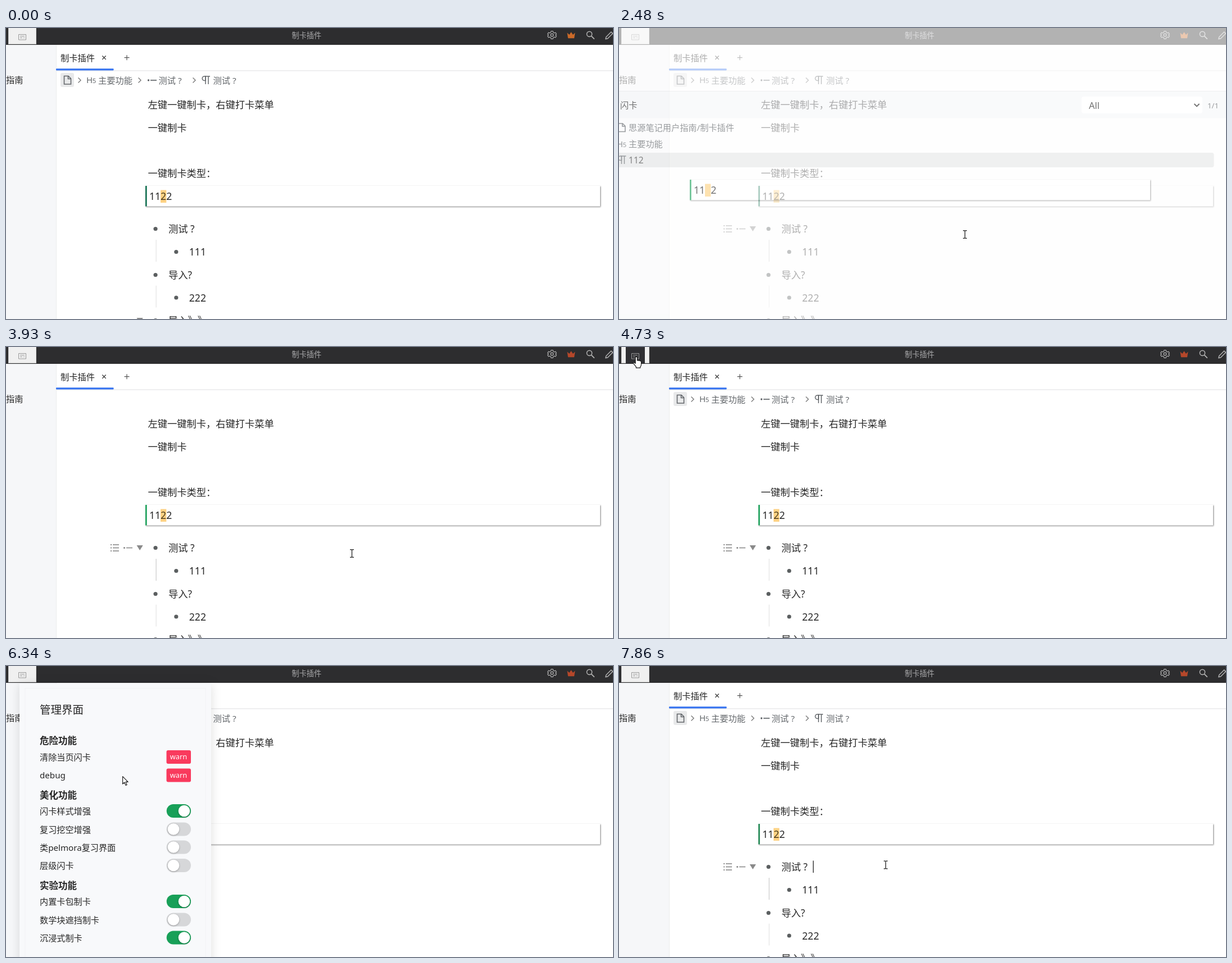
Recreate the animation shown at these times as an HTML page. Size 1080 by 518 pixels, loop 8 s.

```html
<!DOCTYPE html>
<html lang="zh-CN">
<head>
<meta charset="utf-8">
<title>制卡插件</title>
<style>
html, body { margin: 0; width: 100%; height: 100%; overflow: hidden; background: #fff; }
svg { display: block; width: 1080px; height: 518px; }
text { font-family: "Noto Sans", "Noto Sans CJK SC", sans-serif; white-space: pre; text-spacing-trim: space-all; }
.card { filter: drop-shadow(1px 1px 1.2px rgba(0, 0, 0, .5)); }
.panel { filter: drop-shadow(0 2px 9px rgba(0, 0, 0, .13)); }
</style>
</head>
<body>
<svg id="stage" viewBox="0 0 1080 518" xmlns="http://www.w3.org/2000/svg"></svg>
<script>
const INK = '#262626', GREY = '#63676b', ICON = '#b4b4b4', GREEN = '#18a058';

// Markup helpers; text is centred on yc.
const text = (x, yc, size, str, fill = INK, more = '') =>
  `<text x="${x}" y="${yc + size * 0.365}" font-size="${size}" fill="${fill}" ${more}>${str}</text>`;
const rect = (x, y, w, h, fill, more = '') =>
  `<rect x="${x}" y="${y}" width="${w}" height="${h}" fill="${fill}" ${more}/>`;
const line = (d, stroke, w = 1.4, more = '') =>
  `<path d="${d}" fill="none" stroke="${stroke}" stroke-width="${w}" ${more}/>`;
const dot = (x, y, r, fill, more = '') =>
  `<circle cx="${x}" cy="${y}" r="${r}" fill="${fill}" ${more}/>`;
const group = (id, body, more = '') => `<g id="${id}" ${more}>${body}</g>`;

const docIcon = (x, y) =>
  line(`M${x} ${y}h7.5l4.5 4.5v10h-12zM${x + 7} ${y}v5h5`, GREY, 1.6);
const pilcrow = (x, y) =>
  `<path d="M${x + 6} ${y - 7}h-2a3.8 3.8 0 0 0 0 7.6h2z" fill="none" stroke="${GREY}" stroke-width="1.5"/>` +
  line(`M${x + 5} ${y - 7}h9M${x + 6} ${y - 7}v14M${x + 11} ${y - 7}v14`, GREY, 1.5);
const heading = (x, y) =>
  text(x, y, 15, 'H', GREY) + text(x + 10.8, y + 1.2, 11.5, '5', GREY);
const chevron = (x, y) => line(`M${x - 2.5} ${y - 4.5}l4.5 4.5-4.5 4.5`, '#777');

function cardBox(x, y, w, barId, word) {
  return rect(x, y, w, 36.5, '#fff', 'class="card"') +
    rect(x, y, 2.6, 36.5, GREEN, barId ? `id="${barId}"` : '') +
    rect(x + 27, y + 7.5, 10.3, 22.5, '#fdd284') +
    text(x + 7, y + 19, 17.6, '11') +
    text(x + 27.1, y + 19, 17.6, word, '#4a3a1a') +
    text(x + 37.2, y + 19, 17.6, '2');
}

function titleBar() {
  const gear = dot(971.5, 12.5, 2.4, 'none', `stroke="${ICON}" stroke-width="1.2"`) +
    line('M970 5.5h3l.6 2.2 2 1.1 2.2-.6 1.5 2.6-1.6 1.7 1.6 1.7-1.5 2.6-2.2-.6-2 1.1-.6 2.2h-3l-.6-2.2-2-1.1-2.2.6-1.5-2.6 1.6-1.7-1.6-1.7 1.5-2.6 2.2.6 2-1.1z', ICON, 1.2);
  return rect(0, 0, 1080, 30, '#2d2d2f') +
    rect(4.5, -0.5, 49, 29, '#f0f0f0', 'stroke="#cfcfcf"') +
    rect(12, 0, 34, 29, '#2f2f33', 'id="hover"') +
    line('M22.5 11.5h13v9.5h-13zM25 14.5h8M25 17.5h4M31 17.5h2', '#999', 1) +
    text(508.5, 13.5, 13.15, '制卡插件', '#a9a9ab') + gear +
    '<path id="crown" d="M998.5 8.5l3.7 3.4 3.3-4.6 3.3 4.6 3.7-3.4-1.5 9.8h-11z"/>' +
    dot(1038, 10.8, 4.6, 'none', `stroke="${ICON}" stroke-width="1.5"`) +
    line('M1041.3 14.2l5.5 5.5', ICON, 1.7) +
    line('M1067 19.5l.7-3.5 9-9 2.8 2.8-9 9z', ICON, 1.4);
}

function page() {
  const row = (x, y, str, size = 17.25) => dot(x, y, 3.6, '#5b5f60') + text(x + 23, y + 0.5, size, str);
  const crumbs = rect(97, 80, 24, 25, '#e8e9ea', 'rx="3"') + docIcon(103.5, 85.5) +
    chevron(131, 93) + heading(143, 93) + text(164, 93, 15.25, '主要功能', GREY) +
    chevron(238, 93) + dot(253.5, 93, 1.7, GREY) + line('M257 93h11', GREY, 1.7) +
    text(271.5, 93, 15.25, '测试 ?', GREY) + chevron(335, 93) + pilcrow(349, 93) +
    text(368.5, 93, 15.25, '测试 ?', GREY);
  let list = '';
  for (const y of [352, 357.5, 363])
    list += rect(186, y - 1, 2, 2, '#8a8a8a') + line(`M190 ${y}h11`, '#8a8a8a', 1.6);
  list += dot(210.5, 357.5, 1.6, '#8a8a8a') + line('M214 357.5h11', '#8a8a8a', 1.6);

  return rect(0, 30, 89, 488, '#f6f7f9') + rect(89, 30, 1, 488, '#eceded') +
    text(0, 92, 15.25, '指南') +
    rect(89, 75.5, 991, 1, '#dfe0e2') + rect(89, 72.3, 102.5, 3.2, '#3573f0', 'rx="1"') +
    text(97, 53, 15.25, '制卡插件') +
    line('M171.3 49.5l6.4 6.4M177.7 49.5l-6.4 6.4', '#444') +
    line('M210.5 52.7h9M215 48.2v9', '#555', 1.2) +
    group('crumbs', crumbs) +
    text(252.5, 137, 17.25, '左键一键制卡\uff0c右键打卡菜单') +
    text(252.5, 177.5, 17.25, '一键制卡') +
    text(252.5, 259, 17.25, '一键制卡类型\uff1a') +
    cardBox(248, 281, 809, 'bar', '2') +
    row(266, 357.5, '测试 ?') + row(302.8, 398.5, '111', 17.6) +
    row(266, 439.5, '导入?') + row(302.8, 480, '222', 17.6) + row(266, 520.5, '导入》》') +
    rect(266.5, 377, 1.2, 39, '#ccc', 'id="guide"') + rect(266.5, 458.5, 1.2, 39, '#e4e4e4') +
    '<path id="fold" d="M232.5 353h11.2l-5.6 9z" fill="#8a8a8a"/>' +
    group('gutter', list) + rect(345, 346.5, 1.2, 21.5, '#111', 'id="caret"');
}

function review() {
  return rect(0, 0, 1080, 518, '#fefefe') +
    rect(0, 112, 1080, 48.5, '#f7f8fa') + rect(0, 112, 1080, 1, '#e6e7e9') +
    text(2, 137.5, 15.25, '闪卡') + rect(823, 122, 215, 30, '#fff', 'rx="4"') +
    text(836, 138, 16.5, 'All') + line('M1023.5 135l4.5 4.5 4.5-4.5', '#222', 1.9) +
    text(1047, 138, 13.2, '1/1', GREY) +
    docIcon(-1, 170) + text(17, 177, 15.2, '思源笔记用户指南/制卡插件', GREY) +
    heading(-4, 206.5) + text(17, 206.5, 15.2, '主要功能', GREY) +
    rect(-10, 222, 1068.5, 26, '#e7e8e8', 'rx="4"') + pilcrow(-1.5, 235) +
    text(17, 235.5, 15.6, '112', '#444') +
    cardBox(126, 270, 819, '', '');
}

function panel() {
  const head = (y, str) => text(60, y, 16.5, str, INK, 'font-weight="700"');
  const item = (y, str) => text(60, y, 15.15, str);
  const warn = (y, str) => item(y, str) + rect(285.5, y - 12, 43.5, 24, '#f93a5d', 'rx="3"') +
    text(291.8, y - 0.5, 12.8, 'warn', '#fff', 'font-weight="500"');
  const toggle = (y, str, on, id = '') => item(y + 0.5, str) +
    `<g ${id && `id="${id}"`}>` + rect(285.7, y - 12, 43.3, 24, on ? GREEN : '#d6d7d9', 'rx="12"') +
    dot(on ? 317 : 298, y, 10.3, '#fff', 'style="filter:drop-shadow(0 1px 1.5px rgba(0,0,0,.3))"') + '</g>';
  return rect(24, 31, 341, 520, '#f8f9fb', 'class="panel"') +
    rect(34, 39.5, 321, 520, '#f8f9fb', 'stroke="#f1f2f5"') +
    text(60, 78, 19.5, '管理界面') +
    head(133, '危险功能') + warn(162, '清除当页闪卡') + warn(194.5, 'debug') +
    head(229.5, '美化功能') + toggle(258, '闪卡样式增强', 1) + toggle(290.5, '复习挖空增强', 0, 'live') +
    toggle(322.5, '类pelmora复习界面', 0) + toggle(355, '层级闪卡', 0) +
    head(390.5, '实验功能') + toggle(419, '内置卡包制卡', 1) +
    toggle(451.5, '数学块遮挡制卡', 0) + toggle(483.5, '沉浸式制卡', 1);
}

const outline = 'fill="#fff" stroke="#111" stroke-width="1.1" stroke-linejoin="round"';
const pointers =
  group('beam', line('M-3.5 -6.8h2.6l.9.8.9-.8h2.6M0 -6v12M-3.5 6.8h2.6l.9-.8.9.8h2.6', '#222', 1.3)) +
  group('arrow', `<path d="M0 0v13.4l3.1-2.8 2.3 5.2 2.1-.9-2.2-5.1h4.2z" ${outline}/>`) +
  group('hand', `<path d="M-1.6 1.2q1.6-2.2 3.2 0v5.6q1.5-1.2 2.7.3 1.6-1 2.5.6 1.8-.5 1.9 1.4v5q0 2.2-1.6 3.6v2.1h-7.5v-1.9l-4.9-6q-.6-1.9 1.4-1.7l2.3 1.7z" ${outline}/>`);

const $ = id => document.getElementById(id);
$('stage').innerHTML = page() + titleBar() + group('panel', panel()) +
  group('review', review()) + group('pointer', pointers);

const LOOP = 8000;
// [time, x, y]
const moves = [
  [280, 1002, 509], [740, 615.5, 367.5], [4160, 615.5, 367.5], [4460, 44, 27], [4640, 44, 27],
  [4820, 18, 8], [5000, 25, 14], [5820, 25, 14], [6670, 299, 288], [6700, 299, 288], [6740, 303, 289],
  [6990, 303, 289], [7070, 312, 291], [7210, 312, 291], [7600, 474.5, 354]
];
const kinds = [
  [0, ''], [280, 'beam'], [2560, 'arrow'], [3790, 'beam'], [4220, 'arrow'], [4460, 'hand'],
  [5900, 'arrow'], [6740, 'hand'], [7270, 'arrow'], [7400, 'beam']
];

const clamp = v => Math.max(0, Math.min(1, v));
const between = (t, a, b) => t >= a && t < b;
const show = (id, on) => $(id).setAttribute('visibility', on ? 'inherit' : 'hidden');
const fade = (id, a) => { $(id).setAttribute('opacity', a); show(id, a > 0); };

function pointerAt(t) {
  const i = moves.findIndex(m => m[0] > t);
  if (i === 0) return moves[0].slice(1);
  if (i < 0) return moves[moves.length - 1].slice(1);
  const [a, b] = [moves[i - 1], moves[i]];
  const p = (t - a[0]) / (b[0] - a[0]);
  const e = p * p * (3 - 2 * p);
  return [a[1] + (b[1] - a[1]) * e, a[2] + (b[2] - a[2]) * e];
}

function draw(t) {
  const hovered = t >= 950;
  show('gutter', hovered);
  $('fold').setAttribute('transform', hovered ? '' : 'translate(0 163)');
  $('guide').setAttribute('fill', between(t, 950, 4260) || t >= 7600 ? '#cacaca' : '#e4e4e4');
  show('caret', between(t, 130, 740) || between(t, 1280, 1800) || t >= 7740);
  show('crumbs', !between(t, 2590, 4260));
  show('hover', between(t, 4400, 5900));
  $('crown').setAttribute('fill', t < 2590 ? '#cb6a29' : '#b5472a');
  $('bar').setAttribute('fill', t < 2590 ? '#0f6e4f' : t < 7740 ? GREEN : '#1c8650');

  fade('review', t < 2340 || t >= 3930 ? 0 : clamp((t - 2290) / 300));
  fade('panel', t < 5670 ? 0 : t < 7740 ? 1 : clamp((7860 - t) / 180));

  const p = clamp((t - 7060) / 300);
  const on = 1 - (1 - p) * (1 - p);
  const [rail, knob] = $('live').children;
  const mix = (a, b) => Math.round(a + (b - a) * on);
  rail.setAttribute('fill', `rgb(${mix(214, 24)},${mix(215, 160)},${mix(217, 88)})`);
  rail.setAttribute('stroke', GREEN);
  rail.setAttribute('stroke-width', 3);
  rail.setAttribute('stroke-opacity', t >= 7000 ? 0.25 : 0);
  knob.setAttribute('cx', 298 + 19 * on);

  const kind = kinds.filter(k => k[0] <= t).pop()[1];
  for (const id of ['beam', 'arrow', 'hand']) show(id, id === kind);
  const [x, y] = pointerAt(t);
  $('pointer').setAttribute('transform', `translate(${x.toFixed(1)} ${y.toFixed(1)})`);
}

const start = performance.now();
function tick() {
  draw((performance.now() - start) % LOOP);
  requestAnimationFrame(tick);
}
draw(0);
requestAnimationFrame(tick);
</script>
</body>
</html>
```
